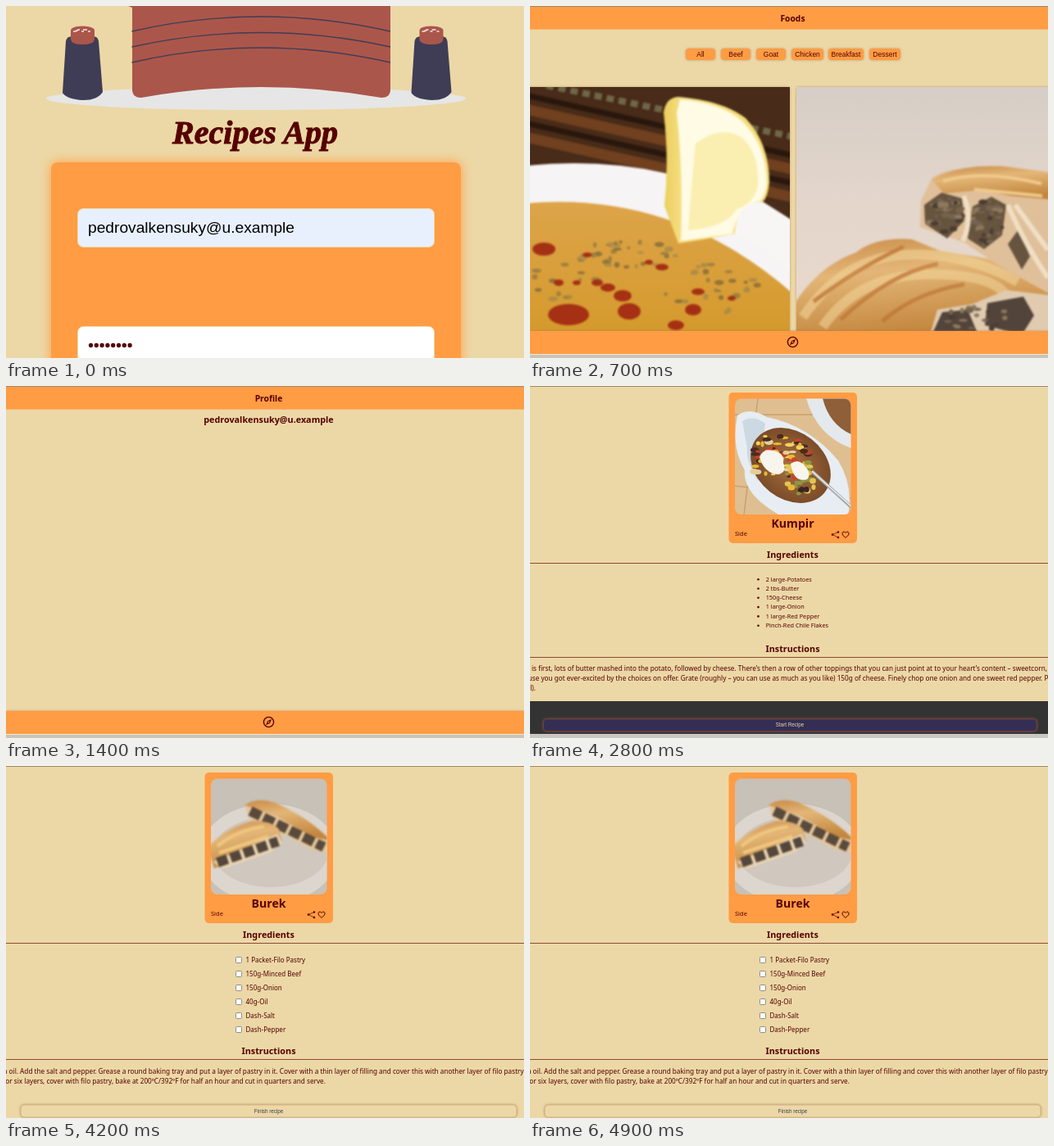
Write an HTML page that moves like this. It is 632x430 px and loops after 5.6 s.

```html
<!DOCTYPE html>
<html lang="en">
<head>
<meta charset="utf-8">
<title>Recipes App</title>
<style>
  html, body { margin: 0; width: 100%; height: 100%; overflow: hidden; background: #ecd8a6; }
  svg { display: block; }
  text { fill: #560000; font-family: "Noto Sans", "Open Sans", sans-serif; white-space: pre; }
  .mid { text-anchor: middle; }
  .end { text-anchor: end; }
  .bold { font-weight: 700; font-size: 10.8px; }
  .bar { font-size: 10.3px; }
  .dish { font-size: 14.1px; }
  .small { font-size: 7.3px; }
  .item { font-size: 8px; }
  .steps { font-size: 8.2px; }
  .ui { font-family: "Liberation Sans", Arial, sans-serif; font-size: 8.5px; }
  .tiny { font-size: 6.27px; }
  .icon { fill: none; stroke: #560000; }
  .glow { filter: drop-shadow(0 0 1.5px #a8774fb0); }
  .soft { filter: blur(1.2px); }
  .scene { display: none; }
</style>
</head>
<body>
<svg id="stage" width="632" height="430" viewBox="0 0 632 430">
  <defs>
    <clipPath id="photoClip"><rect x="250" y="15.500" width="141.500" height="141.500" rx="8"/></clipPath>
    <linearGradient id="wall" x2="0" y2="1"><stop stop-color="#d6cec6"/><stop offset=".5" stop-color="#e4d6cb"/><stop offset="1" stop-color="#e9d9cd"/></linearGradient>
    <linearGradient id="broth" x2="0" y2="1"><stop stop-color="#dda44a"/><stop offset="1" stop-color="#d59a2c"/></linearGradient>
    <linearGradient id="lemon"><stop stop-color="#ecce5c"/><stop offset=".2" stop-color="#f5e18a"/><stop offset="1" stop-color="#f6df78"/></linearGradient>
    <linearGradient id="crust" x2=".3" y2="1"><stop stop-color="#c98a48"/><stop offset=".4" stop-color="#e3b677"/><stop offset="1" stop-color="#c4873f"/></linearGradient>
    <radialGradient id="skin"><stop stop-color="#a9713f"/><stop offset="1" stop-color="#7b4c29"/></radialGradient>

    <g id="glass">
      <path d="M73 43Q74 37 81 37H106Q112 37 113 43L118 105Q112 115 94 115Q74 114 69 106Z" fill="#3f3d56"/>
      <path d="M79 30Q79 25 93 24.500Q108 25 108 30V41Q107 47 93.500 47Q80 47 79 41Z" fill="#ab564b"/>
      <path d="M82 31h4m1-2h3m2 2h3m1-2h3m1 2h3M85 30h3m6-1h2" stroke="#f2e6e2" stroke-width="1.300"/>
    </g>

    <g id="bars">
      <rect width="632" height="28.600" fill="#ff9c44"/>
      <rect width="632" height="1" fill="#a18a68"/>
      <rect y="397" width="632" height="28" fill="#ff9c44" class="glow"/>
      <rect y="425" width="632" height="5" fill="#c9c4b9"/>
      <rect y="425" width="632" height="1" fill="#f4e7cc"/>
      <circle cx="320.500" cy="410.500" r="6.100" class="icon" stroke-width="1.400"/>
      <path d="M324 407l-2 5-5 2.200 2-5z" fill="#560000"/>
      <circle cx="320.500" cy="410.600" r="1" fill="#ff9c44"/>
    </g>

    <g id="photos">
      <rect x="-9" y="99" width="326" height="300" rx="3" class="glow"/>
      <svg y="99" width="317" height="298" viewBox="0 99 317 298">
        <rect y="99" width="317" height="298" fill="#482b18"/>
        <g class="soft">
          <path d="M-5 126L322 200M-5 160L322 234" stroke="#70401f" stroke-width="13"/>
          <path d="M20 97L322 160" stroke="#6f6748" stroke-width="8" stroke-dasharray="9 6"/>
          <path d="M-5 143L322 217M-5 109L322 183" stroke="#29170d" stroke-width="7"/>
          <path d="M-5 195Q190 176 325 280V402H-5Z" fill="#f6f4f4"/>
          <path d="M-5 241Q180 225 325 355V402H-5Z" fill="url(#broth)"/>
          <g id="herbs" opacity=".6"></g>
          <g id="drops" fill="#a02510" opacity=".9"></g>
          <path d="M163 130Q166 111 182 111Q236 116 263 137Q292 168 292 215Q290 234 284 239Q256 246 250 278Q215 285 181 290L164 244Q170 190 163 130Z" fill="url(#lemon)"/>
          <path d="M183 114Q236 119 259 141Q289 170 289 218Q287 232 281 238Q254 244 247 278L184 287Q187 200 179 130Z" fill="#fffbe4"/>
          <path d="M202 168Q235 144 260 162Q280 182 278 220Q272 243 252 248Q240 270 193 274Q197 220 202 168Z" fill="#faeeb0"/>
          <path d="M250 278Q252 240 284 239L325 265V335Q290 292 250 278Z" fill="#f8f6f5"/>
        </g>
      </svg>
      <rect x="325" y="99" width="320" height="300" rx="3" class="glow"/>
      <svg x="325" y="99" width="307" height="298" viewBox="325 99 307 298">
        <rect x="325" y="99" width="307" height="298" fill="url(#wall)"/>
        <g class="soft">
          <path d="M320 368Q350 318 398 301Q422 282 466 285L500 299L640 322V402H320Z" fill="url(#crust)"/>
          <g fill="none" opacity=".55">
            <path d="M333 380Q382 308 456 304T595 337M357 392Q400 330 480 328T580 352" stroke="#f3d79c" stroke-width="12"/>
            <path d="M346 361Q400 320 456 294M379 383Q440 326 498 315M430 385Q470 350 530 340" stroke="#b8692b" stroke-width="5"/>
          </g>
          <path d="M488 402L497 371L540 364L581 347L640 354V402Z" fill="#e0cbb0"/>
          <path d="M490 402L503 374L534 371L547 402ZM555 390L558 363L602 355L615 378L600 402Z" fill="#52443a"/>
          <path d="M490 211Q505 197 546 198L576 195L640 204V355L575 319L530 289L476 270L477 238Z" fill="#dfc09a"/>
          <path d="M490 212Q525 193 576 196L640 204V237L587 232L548 225L505 229Z" fill="url(#crust)"/>
          <path d="M504 214Q550 199 624 217M542 224L625 232" fill="none" stroke="#efc98c" stroke-width="4"/>
          <path d="M481 243L502 228L527 235L530 262L509 284L482 266ZM540 245L563 233L581 243L576 280L554 297L534 284ZM583 291L596 273L610 306L600 322Z" fill="#67543f"/>
          <path d="M529 232Q541 260 528 287M583 243Q603 290 632 332M592 243L632 298" fill="none" stroke="#f0dfc4" stroke-width="6"/>
          <g id="mince"></g>
        </g>
      </svg>
    </g>

    <g id="card">
      <rect width="632" height="1" fill="#a18a68"/>
      <rect x="242.500" y="8" width="156.500" height="184" rx="5" fill="#ff9c44"/>
      <text x="250" y="183" style="font-size:7.500px">Side</text>
      <path d="M376 178.500L369 181.500L376 185" class="icon" stroke-width=".7"/>
      <path d="M376 178.500h0M369 181.500h0M376 185h0" class="icon" stroke-width="2.600" stroke-linecap="round"/>
      <path d="M385 185.500L381.500 182Q380 179.500 382 178.200Q384 177.500 385 179.500Q386 177.500 388 178.200Q390 179.500 388.500 182Z" class="icon"/>
      <text x="320.500" y="210" class="mid bold">Ingredients</text>
      <rect y="216" width="632" height="1" fill="#8d4a37"/>
    </g>
  </defs>

  <rect width="632" height="430" fill="#ecd8a6"/>

  <g class="scene">
    <ellipse cx="305" cy="113" rx="256" ry="14" fill="#e6e6e6"/>
    <path d="M149 0H469V102Q469 112 458 112Q311 86 165 112Q154 112 154 102V2Z" fill="#ab564b"/>
    <path d="M153.500 31Q311 -5 469 31M153.500 50Q311 15 469 50M153.500 69Q311 33 469 69" fill="none" stroke="#3f3d56" stroke-width="1.300"/>
    <use href="#glass"/>
    <use href="#glass" x="425.500"/>
    <text x="304" y="168" class="mid" stroke="#560000" style="font:italic 700 40px 'Liberation Serif',serif">Recipes App</text>
    <rect x="55" y="191" width="500" height="260" rx="8" fill="#ff9c44" style="filter:drop-shadow(0 0 7px #ff9c44)"/>
    <g stroke="#ecd8a6">
      <rect x="87.500" y="247.500" width="435" height="47" rx="7" fill="#e8f0fe"/>
      <rect x="87.500" y="391.500" width="435" height="47" rx="7" fill="#fff"/>
    </g>
    <text x="100" y="277" class="ui" style="font-size:19.200px;fill:#000">pedrovalkensuky@u.example</text>
    <path d="M103.500 414.500H151.500" class="icon" stroke-width="5.300" stroke-linecap="round" stroke-dasharray="0 6.800"/>
  </g>

  <g class="scene">
    <use href="#photos"/><use href="#bars"/>
    <text x="320.500" y="18.500" class="mid bold bar">Foods</text>
    <g id="filters"></g>
  </g>

  <g class="scene">
    <use href="#bars"/>
    <text x="320.500" y="18.500" class="mid bold bar">Profile</text>
    <text x="320.500" y="44.500" class="mid bold">pedrovalkensuky@u.example</text>
  </g>

  <g class="scene">
    <use href="#photos"/><use href="#bars"/>
    <text x="320.500" y="18.500" class="mid bold bar">Foods</text>
    <g stroke="#dcb78c">
      <rect x="-5" y="36" width="642" height="14" fill="#fff"/>
      <rect x="-5" y="71" width="642" height="14" fill="#efefef"/>
    </g>
    <circle cx="308" cy="58.500" r="3" fill="#fff" stroke="#767676" stroke-width=".7"/>
    <text x="313" y="61.500" style="font-size:8.100px">Name</text>
    <text x="320.500" y="80.800" class="mid ui">Search</text>
  </g>

  <g class="scene">
    <use href="#card"/>
    <g clip-path="url(#photoClip)">
      <rect x="250" y="15" width="142" height="143" fill="#dfbf91"/>
      <path d="M250 35H392M250 122L392 137M278 15L261 158" stroke="#c9a16d" stroke-width="1.500"/>
      <path d="M337 15H392V76Q350 61 337 15Z" fill="#e4e9ed"/>
      <path d="M357 15H392V59Q365 47 357 15Z" fill="#8e5f38"/>
      <path d="M253 36Q268 25 289 38Q340 48 376 91Q395 122 388 158H305Q259 132 262 103Q245 74 253 36Z" fill="#e7edf2"/>
      <path d="M259 43Q273 34 287 46L278 116Q263 92 265 76Z" fill="#cdd9e2"/>
      <ellipse cx="318" cy="97" rx="53" ry="41" transform="rotate(38 318 97)" fill="url(#skin)"/>
      <g id="toppings"></g>
      <path d="M280 87Q284 76 297 79Q311 82 309 94Q314 105 303 108Q286 107 280 87ZM318 95Q326 89 333 95Q345 107 338 114Q322 119 318 95Z" fill="#f8f5ee"/>
      <path d="M344 104L392 148" stroke="#a4a8ab" stroke-width="4"/>
      <path d="M344 104L392 147" stroke="#eceeef" stroke-width="1.500"/>
    </g>
    <text x="320.500" y="173" class="mid bold dish">Kumpir</text>
    <g id="bullets"></g>
    <text x="320.500" y="324.500" class="mid bold">Instructions</text>
    <rect y="331" width="632" height="1" fill="#8d4a37"/>
    <g class="steps">
      <text x="2" y="348">is first, lots of butter mashed into the potato, followed by cheese. There’s then a row of other toppings that you can just point at to your heart’s content – sweetcorn,</text>
      <text x="-20.500" y="360">because you got ever-excited by the choices on offer. Grate (roughly – you can use as much as you like) 150g of cheese. Finely chop one onion and one sweet red pepper. Put</text>
      <text x="7" y="372" class="end">bowl).</text>
    </g>
    <rect y="385" width="632" height="40" fill="#333"/>
    <rect y="425" width="632" height="5" fill="#c9c7c4"/>
    <rect x="16.500" y="407" width="601.500" height="14.500" rx="4" fill="#342e55" stroke="#71383b" class="glow"/>
    <text x="317" y="416.300" class="mid ui tiny" style="fill:#ecd8a6">Start Recipe</text>
  </g>

  <g class="scene">
    <use href="#card"/>
    <g clip-path="url(#photoClip)">
      <rect x="250" y="15" width="142" height="143" fill="#c8c1b7"/>
      <ellipse cx="321" cy="107" rx="84" ry="61" fill="#dcd6ce"/>
      <ellipse cx="323" cy="105" rx="70" ry="43" fill="#d0c8be"/>
      <g class="soft">
        <path d="M291 48Q306 37 329 45Q372 65 396 91V107L372 102L328 78L297 65Z" fill="#e5c79c"/>
        <path d="M291 48Q306 37 329 45Q372 65 396 91L374 87L330 61Z" fill="url(#crust)"/>
        <path d="M298 55L388 99" stroke="#5a4a3c" stroke-width="12" stroke-dasharray="14 4"/>
        <path d="M246 99Q270 75 301 67Q323 66 333 77L337 93L307 104L254 125Z" fill="url(#crust)"/>
        <path d="M258 98Q282 78 315 74M260 106L320 86" fill="none" stroke="#f0c77f" stroke-width="4"/>
        <path d="M253 117L331 83L337 94L324 105L263 126Z" fill="#ead4b2"/>
        <path d="M258 118L332 92" stroke="#54463a" stroke-width="12" stroke-dasharray="13 4"/>
      </g>
    </g>
    <text x="320.500" y="173" class="mid bold dish">Burek</text>
    <g id="checks"></g>
    <text x="320.500" y="352" class="mid bold">Instructions</text>
    <rect y="358" width="632" height="1" fill="#8d4a37"/>
    <g class="steps">
      <text x="-5.700" y="375.500">in oil. Add the salt and pepper. Grease a round baking tray and put a layer of pastry in it. Cover with a thin layer of filling and cover this with another layer of filo pastry which</text>
      <text x="-3.500" y="387.500">for six layers, cover with filo pastry, bake at 200ºC/392ºF for half an hour and cut in quarters and serve.</text>
    </g>
    <rect x="18" y="414" width="605" height="15" rx="4" fill="#ecd8a6" stroke="#d5b283" class="glow"/>
    <text x="320.500" y="423.800" class="mid ui tiny" style="fill:#3f3d56">Finish recipe</text>
  </g>
</svg>
<script>
  const fill = (id, parts) => document.getElementById(id).innerHTML = parts.join('');

  let seed = 7;
  const random = () => (seed = seed * 16807 % 2147483647) / 2147483647;
  const ellipse = (x, y, rx, ry, color = '') =>
    `<ellipse cx="${x}" cy="${y}" rx="${rx}" ry="${ry}" ${color && `fill="${color}"`}/>`;

  // Random specks gathered around a point.
  const scatter = (count, x, y, spreadX, spreadY, size, colors) =>
    Array.from({ length: count }, () => {
      const angle = random() * 2 * Math.PI, reach = Math.sqrt(random());
      return ellipse(x + Math.cos(angle) * reach * spreadX, y + Math.sin(angle) * reach * spreadY,
        size * (.5 + random()), size * (.4 + random() * .5), colors[Math.floor(random() * colors.length)]);
    });

  const greens = ['#7b6d40', '#645a38', '#94824f'];
  fill('herbs', [
    ...scatter(30, 118, 305, 62, 18, 4, greens),
    ...scatter(14, 45, 332, 45, 28, 4, greens),
    ...scatter(24, 225, 348, 60, 33, 4, greens)
  ]);
  fill('drops', [
    [17, 297, 14, 8], [47, 377, 25, 13], [121, 373, 14, 10], [113, 354, 11, 7], [95, 344, 9, 5],
    [70, 304, 6, 3], [161, 319, 8, 4], [145, 313, 5, 3], [199, 371, 10, 7], [205, 349, 8, 4],
    [246, 357, 5, 3], [35, 338, 6, 4], [57, 338, 5, 3], [82, 338, 7, 4], [178, 390, 10, 6]
  ].map(drop => ellipse(...drop)));
  const meats = ['#76634e', '#4a3c31', '#8d785e'];
  fill('mince', [
    ...scatter(30, 506, 255, 22, 22, 4, meats),
    ...scatter(30, 558, 266, 20, 28, 4, meats),
    ...scatter(20, 545, 382, 50, 14, 4, meats)
  ]);
  fill('toppings', [
    ...scatter(70, 305, 89, 37, 32, 4, ['#e9b931', '#f1d25c', '#c8432a', '#4a2b22', '#e4cf9a']),
    ...scatter(25, 332, 112, 20, 20, 4, ['#e9b931', '#e3c552', '#382625', '#8f9544'])
  ]);

  fill('filters', [
    ['All', 190, 36], ['Beef', 233, 36], ['Goat', 276, 36],
    ['Chicken', 319, 39], ['Breakfast', 364, 43], ['Dessert', 414, 38]
  ].map(([label, x, width]) =>
    `<rect x="${x}" y="52" width="${width}" height="14" rx="4" fill="#ff9c44" class="glow"/>
     <text x="${x + width / 2}" y="61.500" class="mid ui">${label}</text>`));

  fill('bullets', ['2 large-Potatoes', '2 tbs-Butter', '150g-Cheese', '1 large-Onion',
    '1 large-Red Pepper', 'Pinch-Red Chile Flakes'].map((label, i) =>
    ellipse(278.5, 236.2 + i * 11.3, 1.3, 1.3, '#560000') +
    `<text x="287.700" y="${238.5 + i * 11.3}" class="small">${label}</text>`));

  fill('checks', ['1 Packet-Filo Pastry', '150g-Minced Beef', '150g-Onion', '40g-Oil',
    'Dash-Salt', 'Dash-Pepper'].map((label, i) =>
    `<rect x="280.500" y="${233.5 + i * 17}" width="7" height="7" rx="1" fill="#fff" stroke="#767676" stroke-width=".8"/>
     <text x="292.500" y="${239.7 + i * 17}" class="item">${label}</text>`));

  const scenes = document.querySelectorAll('.scene');
  const order = [0, 1, 2, 3, 4, 4, 5, 5];
  const start = performance.now();
  function draw() {
    const step = Math.floor((performance.now() - start) / 700) % order.length;
    scenes.forEach((scene, i) => scene.style.display = i === order[step] ? 'inline' : 'none');
    requestAnimationFrame(draw);
  }
  draw();
</script>
</body>
</html>
```
